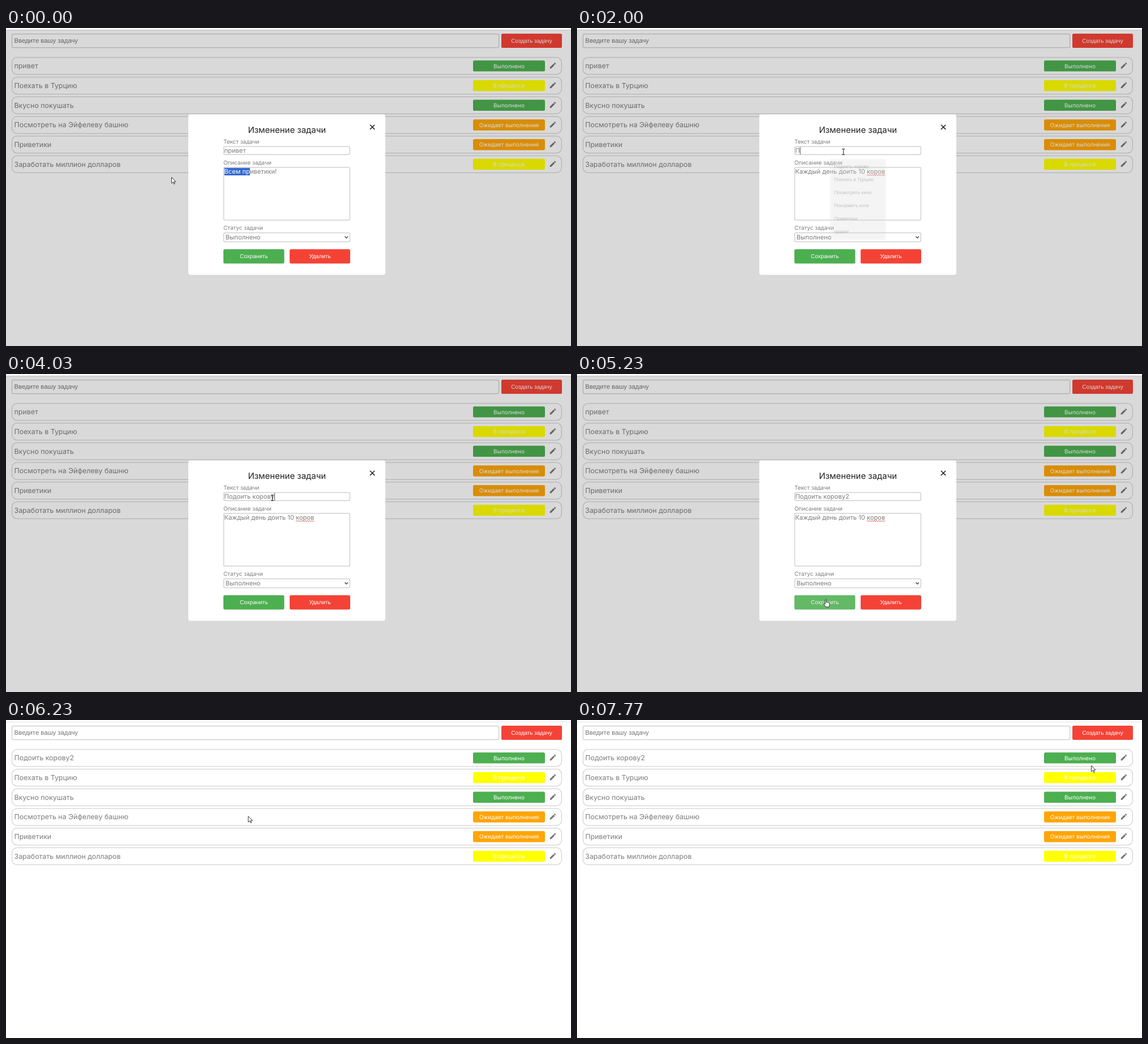
These frames come from a looping animation (998 by 561 pixels, 7800 ms). An HTML page with a canvas:

```html
<!DOCTYPE html>
<html lang="ru">
<head>
<meta charset="utf-8">
<title>Список задач</title>
<style>
  html, body { margin: 0; width: 100%; height: 100%; overflow: hidden; background: #fff; }
  canvas { display: block; }
</style>
</head>
<body>
<canvas id="stage" width="998" height="561"></canvas>
<script>
const ctx = document.getElementById('stage').getContext('2d');
const LOOP = 7800;
const INTER = 'Inter, sans-serif';
const ARIAL = '"Liberation Sans", Arial, sans-serif';
const GRAY = '#7d7d7d', GREEN = '#4caf50', RED = '#f44336', BLUE = '#3367d1';

// Key times in ms
const TYPE_START = 100, TYPE_STEP = 27;
const FIELD_CLICK = 1050, FIELD_SELECT = 1500;
const POPUP_IN = 2000, POPUP_OUT = 3870;
const HOVER = 4980, CLOSE = 5470;
const RELOAD = 6500, LOADED = 6900;

const NOTE = 'Каждый день доить 10 коров';
const OLD_NOTE = 'Всем приветики!';
const TITLE = 'Подоить корову2';
const KEY_TIMES = [2000, 2230, 2400, 2570, 2650, 2730, 2930, 3000, 3100, 3170, 3370, 3470, 3600, 3870, 4500];
const HINTS = ['Подоить корову', 'Поехать в Турцию', 'Посмотреть кино', 'Покормить кота', 'Приветики', 'привет'];

const STATUS = {
  done: ['Выполнено', GREEN],
  active: ['В процессе', '#ffff00'],
  waiting: ['Ожидает выполнения', '#ffa508']
};
const TASKS = [
  ['привет', 'done'],
  ['Поехать в Турцию', 'active'],
  ['Вкусно покушать', 'done'],
  ['Посмотреть на Эйфелеву башню', 'waiting'],
  ['Приветики', 'waiting'],
  ['Заработать миллион долларов', 'active']
];

// Pointer path: time, x, y
const PATH = [
  [0, 292.5, 263.5], [430, 292.5, 263.5], [830, 452, 272], [930, 470.5, 225.5], [1030, 470.5, 218.5],
  [4600, 470.5, 218.5], [5030, 438.5, 398], [5500, 438.5, 398], [6230, 428, 170], [6770, 398.5, 36.5],
  [7070, 262, 29], [7200, 226, 68], [7400, 410, 127], [7770, 908.5, 80.5], [LOOP, 908.5, 80.5]
];

const PENCIL = new Path2D('M3 17.25V21h3.75L17.81 9.94l-3.75-3.75L3 17.25zM20.71 7.04c.39-.39.39-1.02 0-1.41l-2.34-2.34c-.39-.39-1.02-.39-1.41 0l-1.83 1.83 3.75 3.75 1.83-1.83z');
const ARROW = new Path2D('M0 0V10.4L2.5 8.2L4.2 11.9L5.8 11.2L4.2 7.6H7.4Z');
const HAND = new Path2D('M0 1Q0-.3 1-.3T2 1V5Q3.2 4.2 4 5.2Q5.2 4.6 6 5.7Q7.5 5.4 7.5 7V9.5Q7.5 11 6.5 13H.8Q-.2 11-2.6 8Q-3 6.8-1.8 6.7L0 8Z');

const clamp = v => Math.max(0, Math.min(1, v));
const ramp = (t, a, b) => clamp((t - a) / (b - a));

function setFont(size, family) {
  ctx.font = `${size}px ${family}`;
}

function text(str, x, y, size, color, family = INTER, align = 'left') {
  setFont(size, family);
  ctx.fillStyle = color;
  ctx.textAlign = align;
  ctx.fillText(str, x, y);
}

function widthOf(str, size) {
  setFont(size, INTER);
  return ctx.measureText(str).width;
}

function box(x, y, w, h, r, fill, stroke) {
  ctx.beginPath();
  ctx.roundRect(x, y, w, h, r);
  if (fill) {
    ctx.fillStyle = fill;
    ctx.fill();
  }
  if (stroke) {
    ctx.strokeStyle = stroke;
    ctx.lineWidth = 1.25;
    ctx.stroke();
  }
}

function line(points, color, width) {
  ctx.beginPath();
  points.forEach(([x, y]) => ctx.lineTo(x, y));
  ctx.strokeStyle = color;
  ctx.lineWidth = width;
  ctx.stroke();
}

function button(label, x, y, w, h, color) {
  box(x, y, w, h, 2.6, color);
  text(label, x + w / 2, y + h / 2 + 3.5, 10, '#fff', ARIAL, 'center');
}

function drawTask(label, status, i) {
  const y = 51.9 + 34.7 * i, mid = y + 15;
  const [name, color] = STATUS[status];
  box(10.6, y, 970.8, 30, 9, '#fff', '#d3d3d3');
  text(label, 14.5, mid + 4.4, 12.4, GRAY);
  box(825, mid - 9.7, 127, 19.4, 2.6, color);
  text(name, 888.5, mid + 3.7, 9.95, '#fff', INTER, 'center');
  ctx.save();
  ctx.translate(959, mid - 7.6);
  ctx.scale(0.58, 0.58);
  ctx.fillStyle = '#757575';
  ctx.fill(PENCIL);
  ctx.restore();
}

function drawPage(t) {
  ctx.fillStyle = '#fff';
  ctx.fillRect(0, 0, 998, 561);
  ctx.fillStyle = '#e4e4e4';
  ctx.fillRect(0, 3, 998, 1);
  box(10.6, 10.6, 860, 23.9, 2.6, '#fff', '#cbcbcb');
  text('Введите вашу задачу', 14.5, 26.3, 11.3, '#757575', ARIAL);
  button('Создать задачу', 875, 10, 107, 25, RED);
  if (t >= RELOAD && t < LOADED) return;
  TASKS.forEach(([label, status], i) => drawTask(i === 0 && t >= CLOSE ? TITLE : label, status, i));
}

function drawButtons(t) {
  const fade = t < CLOSE ? 1 : 0.96 * (1 - ramp(t, CLOSE, CLOSE + 300));
  const hover = 0.13 * ramp(t, HOVER, HOVER + 250) + 0.05 * ramp(t, 5240, CLOSE);
  ctx.globalAlpha = fade * (1 - hover);
  button('Сохранить', 384, 390.2, 107.5, 25.2, GREEN);
  ctx.globalAlpha = fade;
  button('Удалить', 501, 390.2, 107, 25.2, RED);
  ctx.globalAlpha = 1;
}

function caret(x, y) {
  ctx.fillStyle = '#444';
  ctx.fillRect(x, y, 0.9, 13);
}

function selectedText(str, count, x, baseline) {
  const w = widthOf(str.slice(0, count), 11.2);
  const top = baseline - 10.6;
  text(str, x, baseline, 11.2, GRAY);
  ctx.save();
  ctx.beginPath();
  ctx.rect(x, top, w, 13.4);
  ctx.clip();
  ctx.fillStyle = BLUE;
  ctx.fillRect(x, top, w, 13.4);
  text(str, x, baseline, 11.2, '#fff');
  ctx.restore();
}

function drawTitleField(t) {
  if (t >= FIELD_SELECT && t < POPUP_IN) {
    selectedText('привет', 6, 385.5, 220.3);
    return;
  }
  const typed = KEY_TIMES.filter(k => t >= k).length;
  const value = typed ? TITLE.slice(0, typed) : 'привет';
  text(value, 385.5, 220.3, 11.2, GRAY);
  const blink = t >= 4230 && t < 4500;
  if (t >= FIELD_CLICK && t < 5000 && !blink) caret(385.5 + widthOf(value, 11.2), 210);
}

function drawNote(t) {
  if (t < TYPE_START) {
    selectedText(OLD_NOTE, t < 30 ? 7 : OLD_NOTE.length, 385.5, 257.2);
    return;
  }
  const value = NOTE.slice(0, 1 + Math.floor((t - TYPE_START) / TYPE_STEP));
  const end = 385.5 + widthOf(value, 11.2);
  text(value, 385.5, 257.2, 11.2, GRAY);
  if (t < FIELD_CLICK) caret(end, 246.8);
  if (t < 820) return;
  const wave = [];
  for (let x = end - widthOf('коров', 11.2), i = 0; x <= end; x += 1.9, i++) {
    wave.push([x, i % 2 ? 258.4 : 260.4]);
  }
  line(wave, '#e5423a', 0.9);
}

function drawModal(t) {
  ctx.fillStyle = 'rgba(0,0,0,.15)';
  ctx.fillRect(0, 3, 998, 558);
  box(322, 152.3, 348, 283.2, 4, '#fff');
  text('Изменение задачи', 496.3, 185, 14.95, '#212121', INTER, 'center');
  line([[643, 170.7], [651.2, 178.9]], '#222', 1.5);
  line([[651.2, 170.7], [643, 178.9]], '#222', 1.5);

  text('Текст задачи', 384, 203.9, 9.95, GRAY);
  box(384.6, 209.1, 222.8, 14.3, 2.6, '#fff', '#c9c9c9');
  drawTitleField(t);

  text('Описание задачи', 384, 240.8, 9.95, GRAY);
  box(384.6, 245.8, 222.8, 93, 2, '#fff', '#c9c9c9');
  drawNote(t);

  text('Статус задачи', 384, 356.2, 9.95, GRAY);
  box(384.6, 361.3, 222.8, 15.7, 2.6, '#fff', '#c9c9c9');
  text('Выполнено', 387.8, 373.4, 11.2, GRAY);
  line([[598.4, 367.7], [601.2, 370.5], [604, 367.7]], '#444', 1.3);
}

function drawPopup(t) {
  const count = t < 2230 ? 6 : t < 2400 ? 4 : 1;
  ctx.save();
  ctx.globalAlpha = ramp(t, POPUP_IN - 30, POPUP_IN + 100) * (1 - ramp(t, POPUP_OUT, 4030));
  ctx.shadowColor = 'rgba(0,0,0,.25)';
  ctx.shadowBlur = 3;
  ctx.shadowOffsetY = 1;
  box(447, 230, 98.3, 5 + 23 * count + 0.2 - 1, 1.5, '#fff');
  ctx.shadowColor = 'transparent';
  ctx.beginPath();
  ctx.moveTo(454, 230.5);
  ctx.lineTo(460, 225.5);
  ctx.lineTo(466, 230.5);
  ctx.fill();
  HINTS.slice(0, count).forEach((hint, i) => text(hint, 454.3, 247 + 23 * i, 8.35, '#222', ARIAL));
  ctx.restore();
}

function pointerAt(t) {
  const i = PATH.findIndex(p => p[0] > t);
  const [t0, x0, y0] = PATH[i - 1], [t1, x1, y1] = PATH[i];
  const k = (t - t0) / (t1 - t0);
  return [x0 + (x1 - x0) * k, y0 + (y1 - y0) * k];
}

function drawPointer(t) {
  const [x, y] = pointerAt(t);
  const inColumn = t < CLOSE && x > 384 && x < 608;
  const overText = inColumn && (y > 209 && y < 224 || y > 246 && y < 339);
  const overButton = inColumn && y > 390 && y < 415;
  ctx.save();
  ctx.translate(x, y);
  if (overText) {
    line([[0, -5], [0, 5]], '#222', 1);
    line([[-2.5, -5], [2.5, -5]], '#222', 1);
    line([[-2.5, 5], [2.5, 5]], '#222', 1);
  } else {
    const shape = overButton ? HAND : ARROW;
    ctx.fillStyle = '#fff';
    ctx.fill(shape);
    ctx.strokeStyle = '#222';
    ctx.lineWidth = 0.9;
    ctx.stroke(shape);
  }
  ctx.restore();
}

function draw(t) {
  ctx.textRendering = 'geometricPrecision';
  drawPage(t);
  if (t < CLOSE) drawModal(t);
  if (t < CLOSE + 300) drawButtons(t);
  if (t >= POPUP_IN && t < 4030) drawPopup(t);
  drawPointer(t);
}

const start = performance.now();
function tick() {
  draw((performance.now() - start) % LOOP);
  requestAnimationFrame(tick);
}
tick();
</script>
</body>
</html>
```
